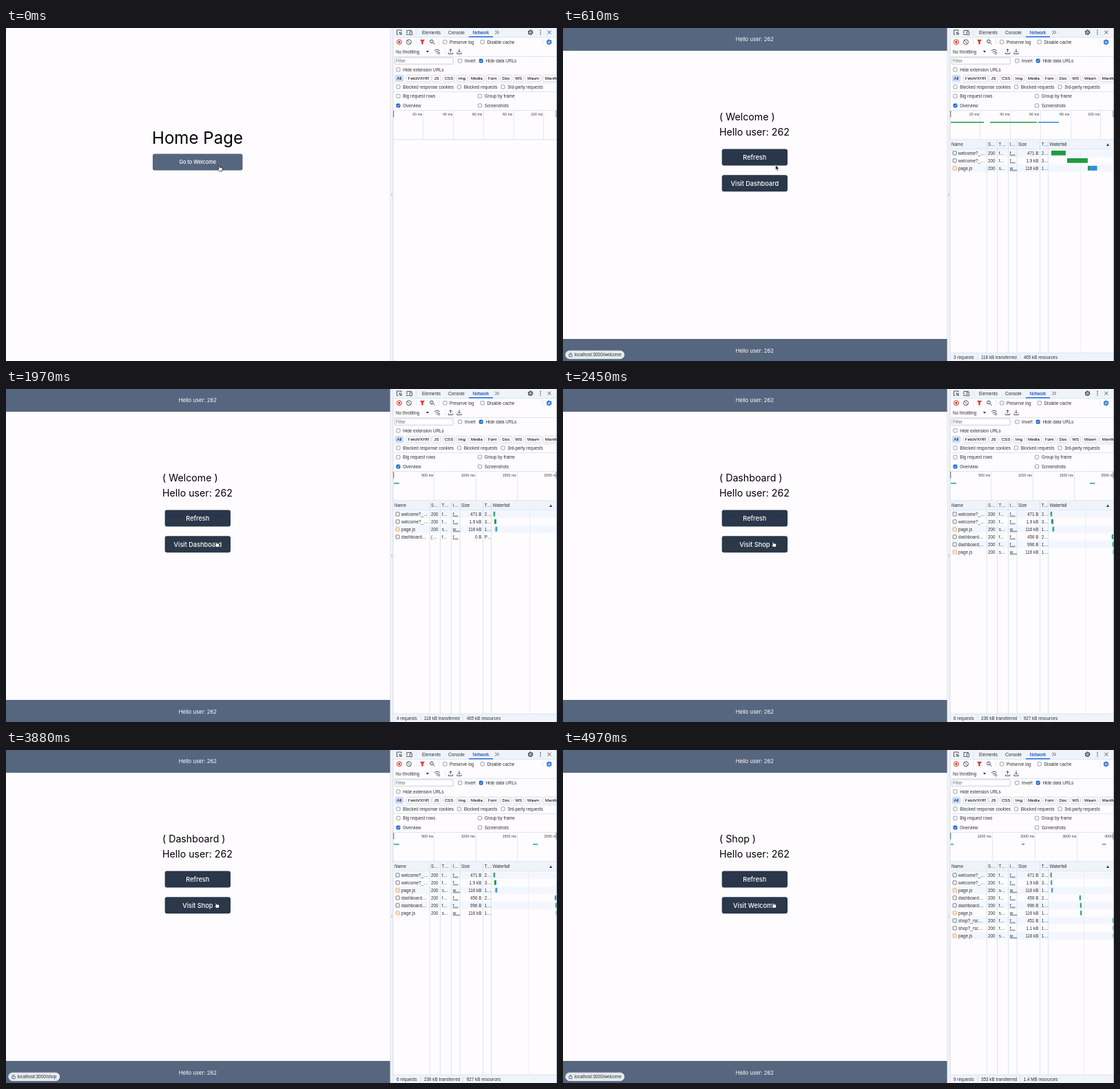
These frames come from a looping animation (800 px wide and 483 px high, 5 s). An HTML page:

```html
<!DOCTYPE html>
<html lang="en">
<head>
<meta charset="utf-8">
<title>Network panel demo</title>
<style>
html, body { margin: 0; width: 100%; height: 100%; overflow: hidden; background: #fefcfe; }
svg { display: block; }
text { white-space: pre; }
.ui { font-family: "Liberation Sans", Arial, sans-serif; }
.page { font-family: Inter, sans-serif; }
</style>
</head>
<body>
<svg id="stage" width="800" height="483" viewBox="0 0 800 483">
  <g id="page"></g>
  <g id="chrome"></g>
  <g id="net"></g>
  <g id="cursor"></g>
</svg>
<script>
const LOOP = 5000;
const INK = '#303134', BLUE = '#1a66d6', LINE = '#d3e1f5', BAR = '#56667f';
const GREEN = '#1e9c40', SKY = '#2d8ee0', TEAL = '#20a08a';
const $ = id => document.getElementById(id);

// y is the middle of the capital letters
const text = (x, y, s, size = 6.35, fill = INK, more = '', font = 'ui') =>
  `<text class="${font}" x="${x}" y="${y + size * .36}" font-size="${size}" fill="${fill}" ${more}>${s}</text>`;
const MID = 'text-anchor="middle"', END = 'text-anchor="end"';
const pageText = (x, y, s, size, fill, more) => text(x, y, s, size, fill, more, 'page');
const rect = (x, y, w, h, fill, more = '') =>
  `<rect x="${x}" y="${y}" width="${w}" height="${h}" fill="${fill}" ${more}/>`;
const path = (d, stroke = '#45484d', width = .9, fill = 'none') =>
  `<path d="${d}" fill="${fill}" stroke="${stroke}" stroke-width="${width}"/>`;
const hline = (y, color = LINE) => rect(562, y, 238, .8, color);

function check(x, y, label, on) {
  const box = rect(x - 2.6, y - 2.6, 5.2, 5.2, on ? BLUE : '#fff',
    `rx="1" stroke="${on ? BLUE : '#74777c'}" stroke-width=".7"`);
  return box + (on ? path(`M${x - 1.5} ${y}l1.2 1.3 2-2.6`, '#fff', .9) : '') + text(x + 6.7, y, label);
}

function gear(x, y, color) {
  return `<circle cx="${x}" cy="${y}" r="2.5" fill="none" stroke="${color}" stroke-width="1.3"/>` +
    `<circle cx="${x}" cy="${y}" r="3.4" fill="none" stroke="${color}" stroke-width="1.1" stroke-dasharray="1.78"/>` +
    `<circle cx="${x}" cy="${y}" r=".9" fill="${color}"/>`;
}

function drawChrome() {
  let s = rect(558, 0, 242, 483, '#fefcfe') + rect(558, 0, 4, 483, '#f2f3f8') +
    rect(557.6, 0, .7, 483, '#dcdfe6') + rect(561.6, 0, .8, 483, '#c9d4e6') +
    rect(559, 240.5, 2, .6, '#9a9da3') + rect(559, 242.2, 2, .6, '#9a9da3') +
    rect(562, 0, 238, 13, '#eff3fa');
  s += [13, 41, 79.6, 92, 119].map(y => hline(y)).join('');

  // tab strip
  s += path('M574 5V3h-6.500v6.500h2M571 6l4 1.500-1.800.700-.700 1.800zM573 8l2 2') +
    path('M582 8V3.500h7M581 9.500h4.500M586.500 5h3v5h-3z') +
    rect(595.5, 2.500, .6, 8, LINE) +
    text(604, 6.500, 'Elements', 6.500) + text(642, 6.500, 'Console', 6.500) +
    text(677.500, 6.500, 'Network', 6.500, '#1f57b5', 'stroke="#1f57b5" stroke-width=".15"') +
    rect(672, 12, 35, 1.400, BLUE) +
    path('M710.300 3.800l2.400 2.500-2.400 2.500M713.300 3.800l2.400 2.500-2.400 2.500') +
    gear(761.500, 6.300, '#45484d') +
    [3.600, 6.300, 9].map(y => `<circle cx="776" cy="${y}" r=".8" fill="#45484d"/>`).join('') +
    path('M786.300 3.800l5 5M791.300 3.800l-5 5');

  // toolbars
  s += `<circle cx="571" cy="20.300" r="3.500" fill="none" stroke="#d8352a" stroke-width="1"/>` +
    rect(569.500, 18.800, 3, 3, '#d8352a') +
    `<circle cx="585" cy="20.300" r="3.500" fill="none" stroke="#45484d" stroke-width=".9"/>` +
    path('M582.600 17.900l4.800 4.800') + rect(595.500, 16, .6, 8.500, LINE) +
    path('M601.500 17.200h6l-2.200 3v3h-1.600v-3z', '#d8352a', .6, '#d8352a') +
    `<circle cx="618" cy="19.400" r="2.300" fill="none" stroke="#45484d" stroke-width="1"/>` +
    path('M619.800 21.200l2.700 2.700', '#45484d', 1) + rect(628.500, 16, .6, 8.500, LINE) +
    check(637.300, 20.300, 'Preserve log') + check(691.700, 20.300, 'Disable cache') +
    rect(779.500, 16, .6, 8.500, LINE) + gear(788.500, 20.500, BLUE) +
    text(566, 34.500, 'No throttling') + path('M610 33l2 2.800 2-2.800z', 'none', 0, INK) +
    path('M622 33q4-3.500 8 0M623.700 34.800q2.300-2 4.400 0M625 36.200l1 1') +
    `<circle cx="628.500" cy="36.500" r="1.300" fill="none" stroke="#45484d" stroke-width=".8"/>` +
    rect(637.500, 30, .6, 8.500, LINE) +
    path('M645.500 35.500v-5M643.500 32.500l2-2 2 2M642.300 35.500v2h6.400v-2') +
    path('M658 30.300v5M656 33.300l2 2 2-2M654.800 35.500v2h6.400v-2') +
    rect(564.300, 43, 85, 9.300, '#fff', 'rx="1" stroke="#a9afb9" stroke-width=".6"') +
    text(566, 48, 'Filter', 6.350, '#6d7177') +
    check(659.300, 47.600, 'Invert') + check(689.700, 47.600, 'Hide data URLs', true) +
    check(569.500, 60.300, 'Hide extension URLs');

  // type filters
  const chips = [['All', 565, 12], ['Fetch/XHR', 581, 36], ['JS', 618.500, 13], ['CSS', 634.500, 17],
    ['Img', 654, 16], ['Media', 672.500, 22], ['Font', 697, 18], ['Doc', 717.500, 17],
    ['WS', 737, 14.500], ['Wasm', 754, 23], ['Manifest', 779.500, 30]];
  s += chips.map(([label, x, w], i) =>
    rect(x, 68.200, w, 9.600, i ? '#fefcfe' : '#c9dcfa', `rx="2.300" stroke="${i ? '#c6cbd6' : '#c9dcfa'}" stroke-width=".7"`) +
    text(x + w / 2, 73, label, 6.200, '#1f2023', MID + ' stroke="#1f2023" stroke-width=".1"')).join('');

  s += check(569.500, 85.400, 'Blocked response cookies') + check(658, 85.400, 'Blocked requests') +
    check(721.500, 85.400, '3rd-party requests') +
    check(569.500, 98.800, 'Big request rows') + check(688, 98.800, 'Group by frame') +
    check(569.500, 112.500, 'Overview', true) + check(688, 112.500, 'Screenshots');
  return s;
}

// Three time scales: ticks [line x, label end], overview bars, table grid line, waterfall bars [x, green, blue]
const SCALES = [
  { ticks: [[605, 605], [649, 649], [693, 692], [737, 736], [780, 780]], step: 20, grid: 751.500,
    spans: [[563, 611, GREEN], [620, 688, GREEN], [690, 720, SKY]],
    falls: [[709, 20, 1], [732, 29, 1], [762, 2, 11.500]] },
  { ticks: [[621, 621], [682, 681.500], [742, 741.500], [800, 802]], step: 500, grid: 758.500,
    spans: [[563, 571, TEAL], [765, 772, TEAL]],
    falls: [[707.800, 1.700, .8], [709, 2, 1], [710.500, 1, 1.700], [796.800, 1.300, 1], [797.800, 1.500, 1], [798.500, .4, .6]] },
  { ticks: [[623, 622.500], [685, 685], [746, 746], [800, 807]], step: 1000, grid: 756.500,
    spans: [[563, 567, TEAL], [666, 670, TEAL], [783, 788, TEAL]],
    falls: [[707.800, 1.200, .6], [708.300, 1.400, .6], [709, .6, 1.400], [749.800, 1.500, .7], [750.800, 1.200, .8],
      [751.200, .8, 1.300], [797.800, .8, .8], [798.300, .4, .6], [798.600, .3, .5]] }
];
const ROWS = [
  ['welcome?_…', '471 B', '2…'], ['welcome?_…', '1.9 kB', '3…'], ['page.js', '116 kB', '1…'],
  ['dashboard…', '456 B', '2…'], ['dashboard…', '996 B', '1…'], ['page.js', '116 kB', '1…'],
  ['shop?_rsc…', '451 B', '1…'], ['shop?_rsc…', '1.1 kB', '1…'], ['page.js', '116 kB', '1…']
];
const STAGES = [
  { from: 0, scale: 0, rows: 0 },
  { from: 400, title: 'Welcome', next: 'Dashboard', scale: 0, rows: 3, sums: ['118 kB', '465 kB'] },
  { from: 1940, title: 'Welcome', next: 'Dashboard', scale: 1, rows: 4, pending: true, sums: ['118 kB', '465 kB'] },
  { from: 2080, title: 'Dashboard', next: 'Shop', scale: 1, rows: 6, sums: ['236 kB', '927 kB'] },
  { from: 3930, title: 'Dashboard', next: 'Shop', scale: 2, rows: 7, pending: true, sums: ['236 kB', '927 kB'] },
  { from: 4060, title: 'Shop', next: 'Welcome', scale: 2, rows: 9, sums: ['353 kB', '1.4 MB'] }
];

function drawRow(i, waiting) {
  const [name, size, time] = ROWS[i], y = 181.300 + i * 11, js = name === 'page.js';
  const color = js ? '#e8913a' : '#55585e', via = js ? 'w…' : 'f…';
  return (i % 2 ? '' : rect(562.400, y - 5.500, 237, 11, '#f3f7fd')) +
    rect(566.200, y - 2.500, 5, 5.200, '#fff', `rx=".6" stroke="${color}" stroke-width=".8"`) +
    (js ? path(`M568.200 ${y - 1}l-1 1 1 1M569.200 ${y - 1}l1 1-1 1`, color, .6) : '') +
    text(574, y, name) + text(617, y, waiting ? '(…' : '200') + text(632.700, y, js ? 's…' : 'f…') +
    text(648.700, y, via, 6.350, INK, 'text-decoration="underline"') +
    text(690.500, y, waiting ? '0 B' : size, 6.350, INK, END) + text(694.700, y, waiting ? 'P…' : time);
}

function drawNet(st) {
  const sc = SCALES[st.scale];
  let s = sc.ticks.map(([x, end], i) => rect(x, 120, .7, 42, LINE) +
    text(end - .5, 125.200, (i + 1) * sc.step + ' ms', 5.300, '#3b3d41', END)).join('') +
    rect(562.300, 120, 1, 9.500, '#5d6067') + rect(798.400, 120, 1, 9.500, '#5d6067') +
    hline(161.500, '#c5daf5');
  if (st.rows) {
    const hidden = st.pending ? 1 : 0;
    const spans = st.rows < 4 ? 3 : Math.ceil((st.rows - hidden) / 3);
    s += sc.spans.slice(0, spans).map(([a, b, c]) => rect(a, 136, b - a, 1.500, c)).join('');
    s += rect(562.400, 163, 237, 12.500, '#eff3fa') + hline(175.300);
    for (let i = 0; i < st.rows; i++) s += drawRow(i, hidden && i === st.rows - 1);
    s += [614.800, 630, 646, 658.800, 692, 704].map(x => rect(x, 163, .8, 308, '#cfdff5')).join('') +
      rect(st.pending && st.scale === 1 ? 760 : sc.grid, 176, .6, 295, '#dde6f3');
    s += [['Name', 564], ['S…', 617], ['T…', 632.500], ['I…', 648.500], ['Size', 661], ['T…', 694.700], ['Waterfall', 706.500]]
      .map(([label, x]) => text(x, 169.200, label)).join('') +
      path('M789 171l2-3.600 2 3.600z', 'none', 0, INK);
    s += sc.falls.slice(0, st.rows - hidden).map(([x, g, b], i) => {
      const y = 177.900 + i * 11;
      return rect(x - 1.500, y + 3, 1.500, .7, '#c3c7ce') + rect(x, y, g, 6.800, GREEN) + rect(x + g, y, b, 6.800, SKY);
    }).join('');
    s += rect(562.400, 471, 237, 12, '#eff3fa') + hline(470.800) +
      text(567, 477.800, st.rows + ' requests') + text(607, 477.800, st.sums[0] + ' transferred') +
      text(668.700, 477.800, st.sums[1] + ' resources') +
      rect(601.700, 473, .6, 9, '#d2d8e3') + rect(663.500, 473, .6, 9, '#d2d8e3');
  }
  return s + rect(799.200, 0, .8, 483, '#8aa0bb');
}

function button(x, y, w, h, fill, label, size) {
  return rect(x, y, w, h, fill, 'rx="3"') +
    pageText(x + w / 2, y + h / 2 + .1, label, size, '#fff', MID + ' font-weight="500"');
}

function drawPage(st, link) {
  if (!st.title) {
    return pageText(278, 159.600, 'Home Page', 24.100, '#000', MID) +
      button(213, 182.500, 130.500, 24, BAR, 'Go to Welcome', 7.400) + drawLink(link);
  }
  const hello = 'Hello user: 262';
  return rect(0, 0, 558, 33, BAR) + rect(0, 451, 558, 32, BAR) +
    pageText(278.300, 16.600, hello, 7.700, '#fff', MID) + pageText(278.300, 468, hello, 7.700, '#fff', MID) +
    pageText(227, 129.300, `( ${st.title} )`, 14.200, '#000') + pageText(227, 150.700, hello, 14.200, '#000') +
    button(230.700, 175.500, 95.300, 24, '#2a364a', 'Refresh', 9.200) +
    button(230.700, 213.300, 95.300, 24, '#2a384a', 'Visit ' + st.next, 9.200) + drawLink(link);
}

function drawLink(name) {
  if (!name) return '';
  return rect(3.800, 468.200, name === 'shop' ? 74 : 85, 11.500, '#e4eaee', 'rx="5.700" stroke="#f6f8fa" stroke-width=".8"') +
    rect(8.800, 473.300, 4.400, 3.300, 'none', 'rx=".5" stroke="#4a4d52" stroke-width=".8"') +
    path('M9.800 473.300v-1.200q1.200-1.600 2.400 0', '#4a4d52', .8) +
    text(16.500, 474.100, 'localhost:3000/' + name, 6.400);
}

const HAND = path('M-2.200-3.600q.9-.7 1.500.2l.8 2 .9-.2 1 .2.900.2q1 .2 1 1.300l-.2 1.900-.8 1.800h-3.600l-2.400-2.400q-.4-1 .7-1l.8.3z', '#111', .8, '#fff');
const ARROW = path('M-1.300-4.300v7.200l1.600-1.400 1.200 2.700 1.200-.5-1.200-2.600 2.200-.2z', '#fff', .5, '#111');

// Pointer stops: time, x, y
const STOPS = [[0, 310.500, 204], [380, 310.500, 204], [610, 310, 203], [1000, 309.500, 207], [1250, 309.500, 209],
  [1500, 309.500, 209], [1760, 306, 225.500], [LOOP, 306, 225.500]];

function pointer(t) {
  const i = STOPS.findIndex(p => p[0] > t), [t0, x0, y0] = STOPS[i - 1], [t1, x1, y1] = STOPS[i];
  const k = (t - t0) / (t1 - t0), e = k * k * (3 - 2 * k);
  return [x0 + (x1 - x0) * e, y0 + (y1 - y0) * e];
}

const hoveredLink = t => t >= 150 && t < 850 ? 'welcome' : t < 2790 ? '' : t < 4130 ? 'shop' : 'welcome';

let drawn = '';
function frame(now) {
  const t = now % LOOP;
  const n = STAGES.filter(s => s.from <= t).length - 1, link = hoveredLink(t);
  if (drawn !== n + link) {
    drawn = n + link;
    $('page').innerHTML = drawPage(STAGES[n], link);
    $('net').innerHTML = drawNet(STAGES[n]);
  }
  const [x, y] = pointer(t), onLink = n === 0 || y > 213;
  $('cursor').innerHTML = `<g transform="translate(${x} ${y})">${onLink ? HAND : ARROW}</g>`;
}

$('chrome').innerHTML = drawChrome();
const start = performance.now();
frame(0);
requestAnimationFrame(function tick() {
  frame(performance.now() - start);
  requestAnimationFrame(tick);
});
</script>
</body>
</html>
```
